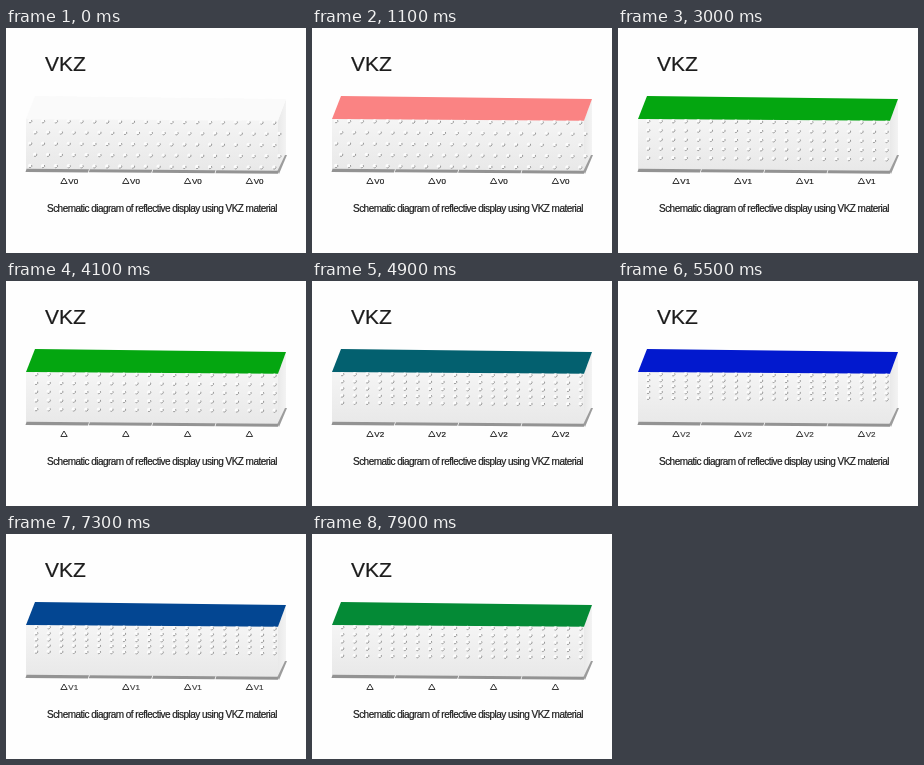
Animation of 300 by 225 pixels, one loop 8000 ms. Source, as an HTML page with a canvas:

```html
<!DOCTYPE html>
<html lang="en">
<head>
<meta charset="utf-8">
<title>Reflective display</title>
<style>
html, body { margin: 0; width: 100%; height: 100%; overflow: hidden; background: #fefefe; }
canvas { display: block; width: 300px; height: 225px; }
</style>
</head>
<body>
<canvas id="stage"></canvas>
<script>
const W = 300, H = 225, LOOP = 8000, STEP = 100;
const FONT = '"Liberation Sans", Arial, sans-serif';
const PALE = [250, 250, 250], RED = [249, 2, 2], GREEN = [4, 166, 16], BLUE = [2, 2, 238];

const canvas = document.getElementById('stage');
const ctx = canvas.getContext('2d');
const ratio = window.devicePixelRatio || 1;
canvas.width = W * ratio;
canvas.height = H * ratio;

// Rises from 0 to 1 between two times.
const ramp = (t, from, to) => Math.min(1, Math.max(0, (t - from) / (to - from)));
const mix = (a, b, k) => a.map((v, i) => v + (b[i] - v) * k);
const fade = (t, from, to) => ramp(t, from, from + 500) - ramp(t, to - 500, to);

function coverColor(t) {
  let c = mix(PALE, RED, ramp(t, 500, 1750));
  c = mix(c, GREEN, ramp(t, 2300, 3000));
  c = mix(c, BLUE, ramp(t, 4300, 5700));
  c = mix(c, GREEN, ramp(t, 6700, 8150));
  return `rgb(${c.map(Math.round)})`;
}

// How far the applied voltage squeezes the beads together.
const squeeze = t => ramp(t, 1500, 3000) + 2 * ramp(t, 3900, 5900) - ramp(t, 6700, 7900);

function poly(fill, ...pts) {
  ctx.beginPath();
  pts.forEach(([x, y]) => ctx.lineTo(x, y));
  ctx.closePath();
  ctx.fillStyle = fill;
  ctx.fill();
}

function gradient(x0, y0, x1, y1, from, to) {
  const g = ctx.createLinearGradient(x0, y0, x1, y1);
  g.addColorStop(0, from);
  g.addColorStop(1, to);
  return g;
}

function text(str, x, y, size, spacing = '0px') {
  ctx.font = `${size}px ${FONT}`;
  ctx.letterSpacing = spacing;
  ctx.fillStyle = ctx.strokeStyle = '#1c1c1c';
  ctx.lineWidth = 0.2;
  ctx.fillText(str, x, y);
  ctx.strokeText(str, x, y);
}

function block(t) {
  poly(gradient(0, 90, 0, 144, '#f5f5f5', '#e8e8e8'), [20, 90], [272, 92], [272, 143], [20, 141]);
  poly(gradient(272, 0, 280, 0, '#e9e9e9', '#f3f3f3'), [272, 92], [280, 71], [280, 127], [272, 143]);
  poly(coverColor(t), [29, 68], [280, 71], [272, 92.8], [20, 91]);
  for (let i = 0; i < 4; i++) {
    const x = 20.5 + i * 63.3, end = x + 61.5, y = 140.8 + i * 0.45;
    poly('#939393', [x, y], [end + 1, y + 0.5], [end, y + 3.6], [x - 1, y + 3.1]);
  }
  poly('#9c9c9c', [271.5, 142.8], [279, 127], [281, 127], [273, 146]);
}

function bead(x, y) {
  ctx.beginPath();
  ctx.arc(x, y, 2, 0, Math.PI * 2);
  ctx.fillStyle = '#fcfcfc';
  ctx.fill();
  ctx.beginPath();
  ctx.arc(x, y, 1.8, -0.5, 2.1);
  ctx.strokeStyle = '#8e8e8e';
  ctx.lineWidth = 0.9;
  ctx.stroke();
}

function beads(t) {
  const loose = 1 - ramp(t, 1100, 2300);
  const rowGap = 11.2 - 2.03 * squeeze(t);
  const colGap = 12.55 + 0.3 * loose;
  for (let row = 0; row < 5; row++) {
    const left = 30 - loose * (row % 2 ? 1 : 6);
    for (let col = 0; col < 20; col++) {
      bead(left + col * colGap, 93 + row * rowGap + col * 0.08);
    }
  }
}

function voltage(name, from, to, t) {
  ctx.globalAlpha = fade(t, from, to);
  for (let i = 0; i < 4; i++) text(name, 62.3 + i * 61.8, 156, 8);
  ctx.globalAlpha = 1;
}

function triangles() {
  ctx.strokeStyle = '#222';
  ctx.lineWidth = 0.9;
  for (let i = 0; i < 4; i++) {
    const x = 58 + i * 61.8;
    ctx.beginPath();
    ctx.moveTo(x, 150);
    ctx.lineTo(x + 3.2, 155.5);
    ctx.lineTo(x - 3.2, 155.5);
    ctx.closePath();
    ctx.stroke();
  }
}

function draw(t) {
  ctx.setTransform(ratio, 0, 0, ratio, 0, 0);
  ctx.fillStyle = '#fefefe';
  ctx.fillRect(0, 0, W, H);
  block(t);
  beads(t);
  triangles();
  voltage('V0', -500, 1900, t);
  voltage('V1', 2000, 3900, t);
  voltage('V2', 4100, 5900, t);
  voltage('V1', 6400, 7700, t);
  text('VKZ', 39, 42.5, 21);
  text('Schematic diagram of reflective display using VKZ material', 41, 184, 10, '-0.53px');
}

const start = performance.now();
function tick() {
  const t = (performance.now() - start) % LOOP;
  draw(Math.floor(t / STEP) * STEP);
  requestAnimationFrame(tick);
}
tick();
</script>
</body>
</html>
```
